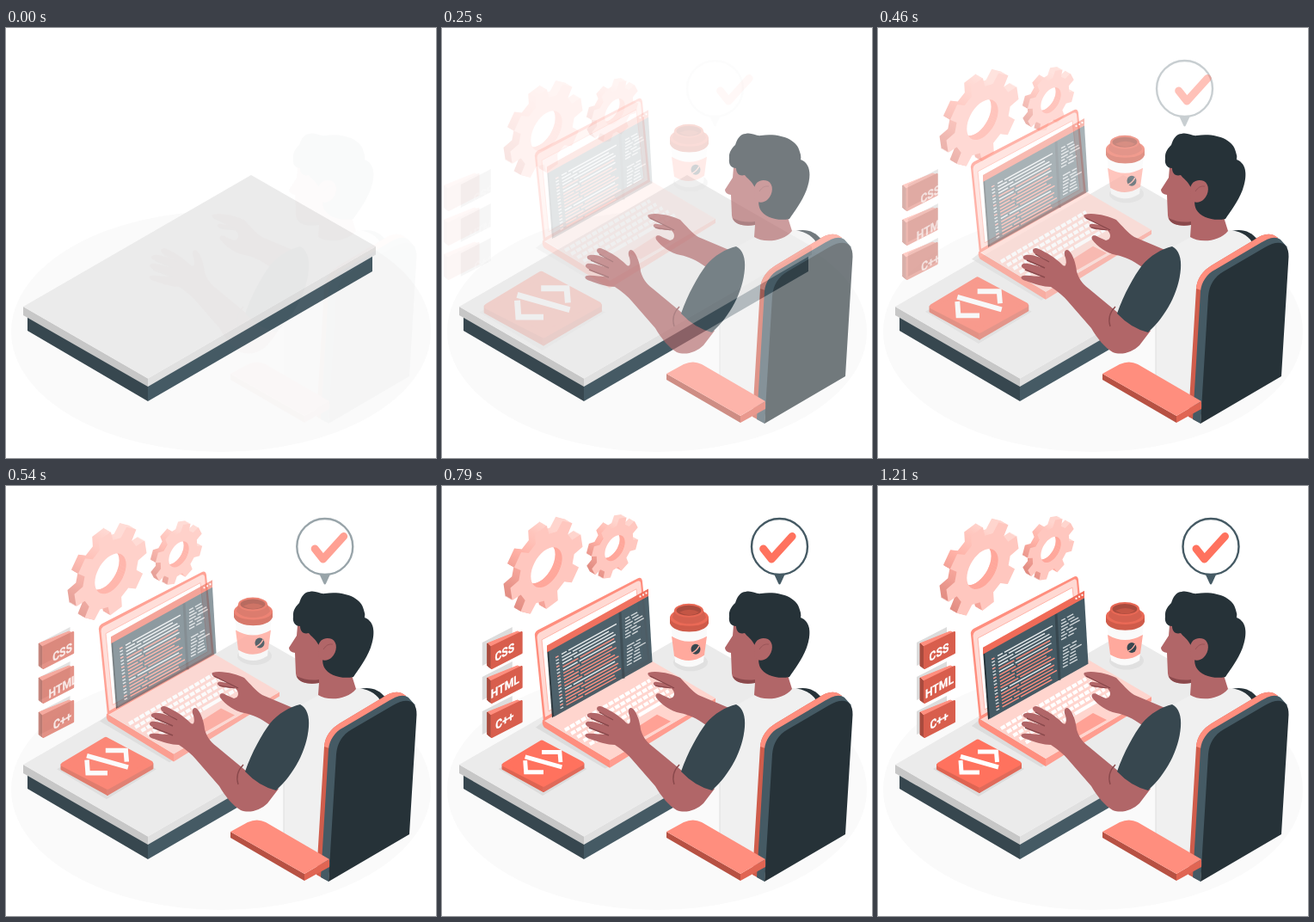
Animation, 500 px wide and 500 px high, one loop 1250 ms. Source, as an HTML page:

```html
<!DOCTYPE html>
<html lang="en">
<head>
<meta charset="utf-8">
<title>Developer at work</title>
<style>
html, body { margin: 0; width: 100%; height: 100%; overflow: hidden; background: #fff; }
svg { display: block; width: 100vw; height: 100vh; }
text { font: bold 14px Roboto, "Liberation Sans", sans-serif; fill: #fff; stroke: #fff; stroke-width: .3; text-anchor: middle; }
</style>
</head>
<body>
<svg viewBox="0 0 500 500">
  <defs>
    <linearGradient id="gearSide" x1="1" y1="0" x2="0" y2="1">
      <stop offset=".25" stop-color="#ffd5ce"/><stop offset=".6" stop-color="#ffb0a5"/><stop offset="1" stop-color="#d98379"/>
    </linearGradient>
    <path id="tagShadow" d="M45 182 L80 164 V191 L45 209Z" fill="#dcdcdc"/>
    <g id="tagBox" stroke-linejoin="round">
      <path d="M49 183 L84 169 L89 171 L53 188Z" fill="#ff8e7e" stroke="#ff8e7e"/>
      <path d="M49 183 L53 187 V212 L49 209Z" fill="#a94b3e" stroke="#a94b3e"/>
      <path d="M54 187 L89 170 V194 L54 212Z" fill="#d85e4d" stroke="#d85e4d" stroke-width="2"/>
    </g>
  </defs>

  <!-- floor and desk -->
  <ellipse cx="250" cy="353" rx="244" ry="140" fill="#fafafa"/>
  <path d="M25 335 L165 415 V434 L25 352Z" fill="#37474f"/>
  <path d="M165 415 L426 264 V283 L165 434Z" fill="#455a64"/>
  <path d="M20 324 L165 407.5 V417 L20 334Z" fill="#c7c7c7"/>
  <path d="M165 407.5 L430 254 V263.5 L165 417Z" fill="#e0e0e0"/>
  <path d="M20 324 L285 171 L430 254 L165 407.5Z" fill="#ebebeb"/>

  <g id="gears"></g>

  <!-- language tags -->
  <g id="tagShadows">
    <use href="#tagShadow"/><use href="#tagShadow" y="40"/><use href="#tagShadow" y="80"/>
  </g>
  <g id="tagBoxes">
    <use href="#tagBox"/><use href="#tagBox" y="40"/><use href="#tagBox" y="80"/>
  </g>
  <g id="tagTexts">
    <text transform="matrix(.866 -.5 0 1 71 198)">CSS</text>
    <text transform="matrix(.866 -.5 0 1 71.5 238)">HTML</text>
    <text transform="matrix(.866 -.5 0 1 71 277.5)">C++</text>
  </g>

  <g id="laptop">
    <path d="M109 279 L118 272 L198 322 L190 327Z" fill="#dcdcdc"/>
    <path d="M117 270 L195 317 V326 L119 279 Q116 276 117 270Z" fill="#ff8e7e"/>
    <path d="M195 317 L318 245 V250 L195 326Z" fill="#ff9d90"/>
    <path d="M118 270 L241 200 L318 245 L195 317Z" fill="#ffd5ce"/>
    <path d="M118 272 L108 173 Q107 169 111 166 L227 106 Q232 103 233 109 L242 202Z" fill="#ff8e7e"/>
    <path d="M120 267 L110.500 174 Q110.500 171 113 169 L227 109 Q230.500 107 231 111 L239 200Z" fill="#ffd9d3"/>
    <path d="M124 260 L116 177 L226 118 L235 198Z" fill="#fff" stroke="#ffb5aa"/>
    <g id="keys" stroke="#fff" stroke-width="4.2"></g>
    <path d="M217 285 L250 264 L266 272 L231 292Z" fill="#ffa195"/>
  </g>

  <g id="codeWindow">
    <path d="M122 190 L126 190 L132 268 L128 271Z" fill="#263238"/>
    <path d="M124 192 L240 129 L244.500 206 L130 270Z" fill="#455a64"/>
    <path d="M207 148 L211 225" stroke="#37474f" stroke-width="3"/>
    <path d="M122 187 L240 121 V129.500 L122 195Z" fill="#f06b58"/>
    <path d="M229.500 130 h2 M233 128 h2 M236.500 126 h2" stroke="#fff" stroke-width="2"/>
    <g id="codeLines" stroke-width="1.4"></g>
  </g>

  <g id="block" stroke-linejoin="round">
    <path d="M64 329 L117 361 L170 329 L117 300Z" fill="#dcdcdc"/>
    <path d="M69 324 L118 350 V356 L69 329Z" fill="#de6452" stroke="#de6452" stroke-width="2"/>
    <path d="M118 350 L166 323 V328 L118 356Z" fill="#e06a5a" stroke="#e06a5a" stroke-width="2"/>
    <path d="M71 324 L116 297 L164 322.500 L118 348Z" fill="#ff725e" stroke="#ff725e" stroke-width="5"/>
    <path d="M96 319 L97 333 H118 M96 314.500 L140 327 M116 309 H137.500 L138.500 321"
      fill="none" stroke="#fff" stroke-width="5" stroke-linejoin="miter"/>
  </g>

  <g id="cup">
    <ellipse cx="289" cy="203" rx="20" ry="10.500" fill="#e0e0e0"/>
    <path d="M266 158 L271 203 Q287 214 304 203 L309 158Z" fill="#fafafa"/>
    <path d="M267 173 Q287 185 308 173 L305 195 Q288 207 270 196Z" fill="#ffa99d"/>
    <ellipse cx="295" cy="188" rx="5.500" ry="6" fill="#37474f"/>
    <path d="M291 192 Q296 190 299 184" fill="none" stroke="#ffa99d" stroke-width="1.4"/>
    <path d="M265 151 V158 C269 171 306 171 310 158 V151Z" fill="#cf5b4a"/>
    <ellipse cx="287.500" cy="151" rx="22.500" ry="10" fill="#ea6956"/>
    <path d="M270 143 L268 151 C274 161 301 161 307 151 L304 143Z" fill="#d5604f"/>
    <ellipse cx="287" cy="143" rx="17" ry="8" fill="#e86855"/>
    <ellipse cx="287" cy="143" rx="14.500" ry="6" fill="#a94b3e"/>
    <path d="M276 145 Q288 139 299 145 Q288 152 276 145Z" fill="#c45645"/>
  </g>

  <g id="person">
    <!-- far arm -->
    <path d="M240 217 C251 214 268 219 277 223 C284 230 290 238 298 243 L336 259 L307 278 C296 270 287 266 277 264
      C266 262 255 254 249 246 C247 241 252 240 256 243 L265 247 C272 246 271 238 266 235 C259 235 252 235 247 232
      C244 229 247 227 251 228 L258 229 L242 222 Q238 219 240 217Z" fill="#b16668"/>
    <path d="M242 221 L260 230 L270 235 M248 232 L266 235" fill="none" stroke="#864649" stroke-width="1.2"/>
    <!-- torso -->
    <path d="M411 236 C423 233 434 236 442 247 L432 254Z" fill="#263238"/>
    <path d="M340 256 L364 243 L405 235 C420 235 430 241 435 249 L388 278 L374 300 L363 434 L323 411 V345Z" fill="#f0f0f0"/>
    <path d="M323 345 V408" stroke="#dedede"/>
    <!-- near arm -->
    <path d="M280 332 L245 303 C236 296 233 290 231 283 C230 274 227 264 222 259 C218 256 215 261 218 267
      C220 275 218 279 214 275 C206 267 196 261 187 257 C181 254 177 259 183 263 L195 269 C188 267 180 263 172 264
      C167 265 168 269 173 270 L190 278 C182 276 174 273 169 274 C165 276 167 279 172 281 L191 289
      C183 289 175 287 169 288 C164 289 167 293 172 294 C183 298 192 301 201 301 C209 306 216 312 221 318
      L248 349 C255 361 264 372 273 377 C283 381 296 377 304 369 L317 352Z" fill="#b16668"/>
    <path d="M183 263 L199 272 M173 270 L194 279 M171 281 L194 290 M276 324 Q266 334 270 347"
      fill="none" stroke="#8a494c" stroke-width="1.4"/>
    <path d="M342 254 C350 258 353 268 352 280 C350 307 335 335 314 354 Q294 349 278 332 C286 309 298 288 307 276
      C317 264 330 257 342 254Z" fill="#37474f"/>
    <!-- head -->
    <path d="M339 162 L338 174 L329 188 Q329 193 336 194 L337 218 C338 229 351 231 364 229 L363 243
      C373 250 397 249 407 236 L402 220 L385 160Z" fill="#b16668"/>
    <path d="M338 221 C341 229 352 231 364 229 L364 225 Q350 227 338 221Z" fill="#8a494c"/>
    <path d="M334 152 C333 144 338 139 341 136 C343 129 347 123 353 123 C360 121 365 126 371 125 C394 122 413 130 416 144
      Q418 149 417 153 C430 158 429 174 424 188 C418 203 410 213 404 222 C390 225 375 220 370 211 C367 204 368 199 371 192
      L363 184 C360 178 355 175 352 171 C345 173 342 168 342 163 C336 163 333 158 334 152Z" fill="#263238"/>
    <path d="M363 187 C364 178 372 175 379 178 C386 182 385 193 379 199 C374 204 367 204 364 199Z" fill="#b16668"/>
    <path d="M369 190 Q373 183 380 184" fill="none" stroke="#9a5558"/>
    <!-- chair -->
    <path d="M361 452 L370 303 C371 291 378 282 388 276 L438 246 C449 238 458 238 465 244 L388 305 L372 458Z" fill="#cf5d4c"/>
    <path d="M370 303 C371 291 378 282 388 276 L438 246 C449 238 458 238 465 244 L392 290 L376 305Z" fill="#ff8e7e"/>
    <path d="M366 455 L375 306 C376 296 382 286 392 281 L443 251 C453 245 461 241 468 246 L476 255 L386 330 L375 460Z" fill="#455a64"/>
    <path d="M375 460 L384 312 C385 299 391 289 402 283 L450 255 C467 245 478 250 477.500 266 L469 405Z" fill="#263238"/>
    <path d="M261 402 L347 451 V459 L261 409Z" fill="#b75143"/>
    <path d="M347 451 L376 434 V443 L347 459Z" fill="#e06553"/>
    <path d="M261 402 L281 391 Q292 386 302 391 L376 434 L347 451Z" fill="#ff8e7e"/>
  </g>

  <g id="bubble">
    <path d="M380 101 H394 L388.500 113 Q387 116 385.500 113Z" fill="#455a64"/>
    <circle cx="387" cy="70.500" r="32.500" fill="#fff" stroke="#455a64" stroke-width="2.4"/>
  </g>
  <path id="check" d="M370 73 L379.500 85 L403.500 58.500" fill="none" stroke="#ff725e" stroke-width="9"
    stroke-linecap="round" stroke-linejoin="round"/>
</svg>

<script>
const LOOP = 1250, FPS = 24;
const byId = id => document.getElementById(id);
const add = (id, markup) => byId(id).insertAdjacentHTML("beforeend", markup);

// A cog lying in the isometric plane that rises to the right.
function gear(cx, cy, radius, hole, phase, depth) {
  const at = (deg, r) => {
    const a = deg * Math.PI / 180, x = r * Math.cos(a);
    return `${(cx + .866 * x).toFixed(1)} ${(cy - .5 * x + r * Math.sin(a)).toFixed(1)}`;
  };
  const circle = r => {
    let d = "";
    for (let a = 0; a < 360; a += 10) d += (a ? "L" : "M") + at(a, r);
    return d + "Z";
  };
  let outline = "";
  for (let i = 0; i < 8; i++) {
    const mid = phase + 45 * i;
    for (const [turn, size] of [[-14, .77], [-9.5, 1], [9.5, 1], [14, .77]])
      outline += (outline ? "L" : "M") + at(mid + turn, radius * size);
  }
  const face = outline + "Z" + circle(hole);
  const extrude = (d, fill) => {
    for (let k = depth; k > 0; k--)
      add("gears", `<path d="${d}" transform="translate(${-k} ${-k * .577})" fill="${fill}" fill-rule="evenodd"/>`);
  };
  extrude(face, "url(#gearSide)");
  extrude(circle(hole + 2) + circle(hole), "#ffa79b");
  add("gears", `<path d="${face}" fill="#ffc7bf" fill-rule="evenodd"/>`);
}
gear(121.5, 96.5, 48.5, 21, -9, 8);
gear(201, 74, 32, 13.5, -70, 6);

for (let row = 0; row < 5; row++) {
  const x = 143 + row * 7.2, y = 282 + row * 4.1;
  add("keys", `<path d="M${x} ${y} l99 -58" stroke-dasharray="${row == 4 ? "6 1.6 6 1.6 34 1.6" : "5.8 1.6"}"/>`);
}

let seed = 7;
const random = () => (seed = seed * 16807 % 2147483647) / 2147483647;
const codeLine = (x, y, length, color) =>
  add("codeLines", `<path d="M${x} ${y} l${length} ${-length * .55}" stroke="${color}"/>`);
for (let row = 0; row < 17; row++) {
  const y = 197 + row * 3.7, x = 139 + row * .35;
  codeLine(x - 7, y + 4, 3.5, row % 3 ? "#d5dadd" : "#ff9d90");
  const color = row < 4 || row % 6 == 5 ? "#e8ebec" : "#ff8e7e";
  const split = 6 + random() * 16;
  codeLine(x, y, split, color);
  codeLine(x + split + 2, y - (split + 2) * .55, (63 - split) * (.75 + random() * .25), color);
}
for (const [x, y] of [[213, 156], [215, 188]])
  for (let row = 0; row < 7; row++) {
    const first = 4 + random() * 5;
    codeLine(x, y + row * 3.7, first, "#cfd5d8");
    codeLine(x + first + 2, y + row * 3.7 - (first + 2) * .55, 5 + random() * 8, "#cfd5d8");
  }

// cubic-bezier(.36, -.01, .5, 1.38)
function ease(x) {
  if (x >= 1) return 1;
  const curve = (u, p, q) => 3 * (1 - u) ** 2 * u * p + 3 * (1 - u) * u * u * q + u ** 3;
  let low = 0, high = 1;
  for (let i = 0; i < 24; i++) {
    const mid = (low + high) / 2;
    if (curve(mid, .36, .5) < x) low = mid; else high = mid;
  }
  return curve(low, -.01, 1.38);
}

// nested: how many times the same slide and fade are stacked
const slides = [
  { id: "gears", dy: 30 },
  { id: "tagShadows", dx: -30 },
  { id: "tagBoxes", dx: -30, nested: 2 },
  { id: "tagTexts", dx: -30 },
  { id: "laptop", dy: -30 },
  { id: "codeWindow", dy: -30, duration: 1.25 },
  { id: "cup", dy: -30 },
  { id: "bubble", dx: -30, nested: 3 },
  { id: "check", dx: -30, nested: 2 },
];

function pose(id, opacity, transform) {
  const el = byId(id);
  el.setAttribute("opacity", Math.min(1, Math.max(0, opacity)));
  if (transform) el.setAttribute("transform", transform);
}

function draw() {
  const ms = performance.now() % LOOP;
  const step = Math.min(29, Math.floor((ms + 5) * FPS / 1000));
  const time = step < 2 ? 0 : step / FPS;
  for (const { id, dx = 0, dy = 0, nested = 1, duration = 1 } of slides) {
    const done = ease(time / duration), left = (1 - done) * nested;
    pose(id, Math.max(0, done) ** nested, `translate(${dx * left} ${dy * left})`);
  }
  const done = ease(time);
  pose("block", done, `translate(118 325) scale(${1.5 - .5 * done}) translate(-118 -325)`);
  pose("person", .02 + time / .4);
  requestAnimationFrame(draw);
}
draw();
</script>
</body>
</html>
```
